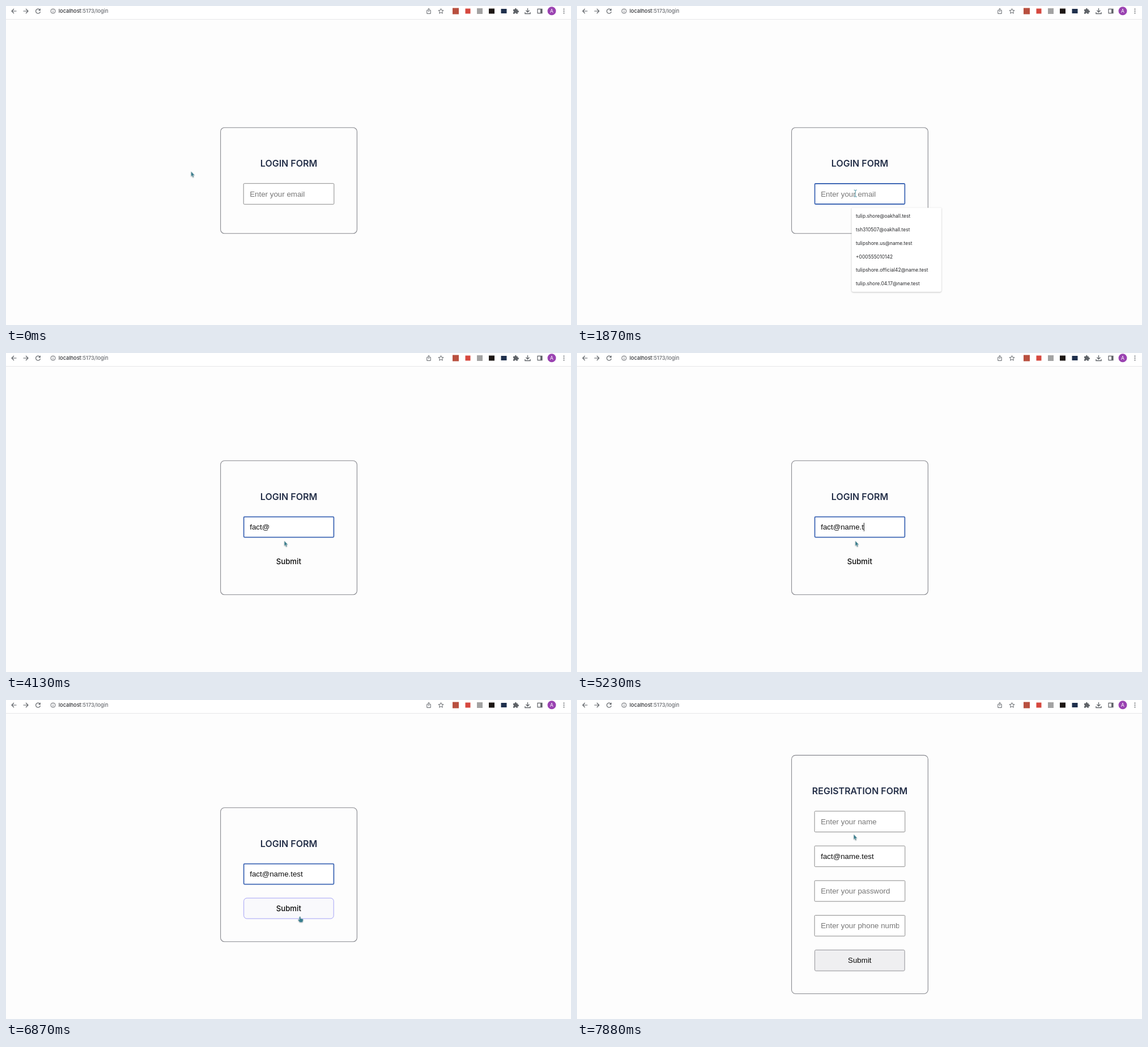
An HTML page with a canvas that plays this animation: 997 px wide and 562 px high, repeating every 8000 ms.

```html
<!DOCTYPE html>
<html lang="en">
<head>
<meta charset="utf-8">
<title>Login form</title>
<style>
  html, body { margin: 0; width: 100%; height: 100%; overflow: hidden; background: #fdfdfd; }
  canvas { display: block; }
</style>
</head>
<body>
<canvas id="stage" width="997" height="562"></canvas>
<script>
const ctx = document.getElementById("stage").getContext("2d");
const LOOP = 8000;
const SANS = '"Liberation Sans", Arial, sans-serif';
const UI = 'Inter, sans-serif';
const FIELD_FONT = `13.33px ${SANS}`;
const INK = "#5f6368";
const EMAIL = "fact@name.test";
const SUGGESTIONS = [
  "tulip.shore@oakhall.test",
  "tsh310507@oakhall.test",
  "tulipshore.us@name.test",
  "+000555010142",
  "tulipshore.official42@name.test",
  "tulip.shore.04.17@name.test"
];

// [time, characters typed, caret visible]
const TYPING = [
  [0, 0, 0], [2020, 1, 1], [2120, 2, 1], [2270, 3, 1], [2820, 3, 0], [2970, 4, 1],
  [3370, 4, 0], [3620, 5, 1], [4130, 5, 0], [4260, 6, 1], [4430, 7, 1], [4590, 8, 1],
  [4920, 9, 1], [5080, 10, 1], [5230, 11, 1], [5690, 11, 0], [6120, 14, 1], [6570, 14, 0]
];

const FOCUS = 1720, SUGGEST = 1870, TYPE = 2020, HOVER = 6720, REGISTER = 7450, LEAVE = 7730;

const clamp = (v, lo, hi) => Math.min(hi, Math.max(lo, v));
const ease = p => p * p * (3 - 2 * p);

function text(str, x, y, font, color, align = "left") {
  ctx.font = font;
  ctx.fillStyle = color;
  ctx.textAlign = align;
  ctx.fillText(str, x, y);
}

function box(x, y, w, h, r, stroke, width = 1, fill) {
  ctx.beginPath();
  ctx.roundRect(x, y, w, h, r);
  if (fill) { ctx.fillStyle = fill; ctx.fill(); }
  if (stroke) { ctx.strokeStyle = stroke; ctx.lineWidth = width; ctx.stroke(); }
}

function disc(x, y, r, color) {
  ctx.beginPath();
  ctx.arc(x, y, r, 0, Math.PI * 2);
  ctx.fillStyle = color;
  ctx.fill();
}

// Draws SVG path data around a centre point.
function icon(x, y, data, { stroke = INK, fill, width = 1.2 } = {}) {
  const path = new Path2D(data);
  ctx.save();
  ctx.translate(x, y);
  if (fill) { ctx.fillStyle = fill; ctx.fill(path); }
  if (stroke) { ctx.strokeStyle = stroke; ctx.lineWidth = width; ctx.stroke(path); }
  ctx.restore();
}

function toolbar() {
  ctx.fillStyle = "#fff";
  ctx.fillRect(0, 0, 997, 23);
  ctx.fillStyle = "#e7e7e8";
  ctx.fillRect(0, 23, 997, 1);

  icon(14, 9, "M4.5 0H-4M0-4L-4 0L0 4");
  icon(35, 9, "M-4.5 0H4M0-4L4 0L0 4");
  icon(56.5, 9, "M3.2-2.4A4 4 0 1 0 4 1");
  icon(56.5, 9, "M4.4-4.8V-.8H.4Z", { stroke: null, fill: INK });
  icon(83, 9, "M4 0A4 4 0 1 1-4 0A4 4 0 1 1 4 0M0-.6V2.3M0-2.4V-1.3", { width: 0.95 });

  const font = `500 9.2px ${UI}`;
  text("localhost", 92.8, 12.2, font, "#303236");
  const hostWidth = ctx.measureText("localhost").width;
  text(":5173/login", 92.8 + hostWidth, 12.2, font, "#6a6d72");

  icon(746, 9, "M-1.4-1.4H-3.2V4.4H3.2V-1.4H1.4M0 1.5V-4.4M-2-2.6L0-4.6L2-2.6", { width: 1 });
  const star = Array.from({ length: 10 }, (_, i) => {
    const a = -Math.PI / 2 + i * Math.PI / 5, r = i % 2 ? 2.1 : 4.7;
    return `${i ? "L" : "M"}${r * Math.cos(a)} ${r * Math.sin(a)}`;
  }).join("") + "Z";
  icon(767.5, 9.3, star, { width: 1 });

  box(788, 3.5, 11, 11, 0, null, 0, "#b9503f");
  box(810.5, 4.5, 9, 9, 0, null, 0, "#d6483f");
  box(831, 4, 10, 10, 0, null, 0, "#a3a3a3");
  box(852, 4.5, 10, 9, 0, null, 0, "#1d1714");
  box(873.5, 5, 10, 8, 0, null, 0, "#1f304d");

  icon(899.5, 9, "M-4.5-3H-1.6A1.5 1.5 0 1 1 1.2-3H3.4V-.7A1.5 1.5 0 1 1 3.4 2.1V4.7H1A1.5 1.5 0 0 0-2 4.7H-4.5V2.3A1.5 1.5 0 0 0-4.5-.6Z",
    { stroke: null, fill: INK });
  icon(920.5, 9, "M0-5V1.6M-3-1.2L0 1.8L3-1.2M-4.6 2V4.5H4.6V2", { width: 1.3 });
  icon(942, 9, "M-4-3.6H4V3.6H-4Z", { width: 1.2 });
  ctx.fillStyle = INK;
  ctx.fillRect(943, 5, 3, 8);
  disc(963, 8.7, 7.5, "#9a42b1");
  text("A", 963, 11.8, `8.5px ${UI}`, "#fff", "center");
  for (const dy of [-3.6, 0, 3.6]) disc(984.5, 9 + dy, 1, INK);
}

function card(top, bottom, title) {
  box(378.6, top, 240.8, bottom - top, 7, "#88898f", 1.1);
  text(title, 499, top + 68.8, `600 16px ${UI}`, "#242f48", "center");
}

function field(cy, { value = "", placeholder = "", focused = false, caret = false }) {
  if (focused) box(419.6, cy - 18, 158.8, 36, 1.5, "#4068b5", 1.8, "#fff");
  else box(419.2, cy - 18.3, 159.6, 36.6, 1.5, "#858585", 0.95, "#fff");
  ctx.save();
  ctx.beginPath();
  ctx.rect(430, cy - 18, 138.4, 36);
  ctx.clip();
  text(value || placeholder, 430.2, cy + 4.7, FIELD_FONT, value ? "#0c0c0c" : "#777");
  if (caret) {
    ctx.fillStyle = "#111";
    ctx.fillRect(430.2 + ctx.measureText(value).width, cy - 7.5, 0.9, 15);
  }
  ctx.restore();
}

function suggestions() {
  ctx.save();
  ctx.shadowColor = "rgba(0,0,0,.28)";
  ctx.shadowBlur = 2.5;
  ctx.shadowOffsetY = 0.8;
  box(484.6, 355.5, 158.4, 148.2, [0, 0, 3, 3], null, 0, "#fff");
  ctx.restore();
  SUGGESTIONS.forEach((line, i) =>
    text(line, 492, 373.4 + i * 23.77, `8.5px ${UI}`, "#27282b"));
}

function submitButton(t) {
  if (t >= HOVER) {
    const step = Math.floor((t - HOVER) / 150);
    const alpha = clamp(0.1 + step * 0.5, 0, 1);
    box(419.6, 349, 158.6, 36.2, 5.5, `rgba(100,98,240,${alpha})`, 0.95, "#f9f9fc");
  }
  text("Submit", 498.8, 372.3, `500 13.2px ${UI}`, "#0b0b0b", "center");
}

function loginForm(t) {
  const [, count, caret] = TYPING.findLast(([start]) => t >= start);
  const typing = t >= TYPE;
  const top = typing ? 189.8 : 214.2;
  card(top, typing ? 425.8 : 400.8, "LOGIN FORM");
  field(top + 116.8, {
    value: EMAIL.slice(0, count),
    placeholder: "Enter your email",
    focused: t >= FOCUS,
    caret
  });
  if (typing) submitButton(t);
  else if (t >= SUGGEST) suggestions();
}

function registrationForm() {
  card(97.4, 517.5, "REGISTRATION FORM");
  [
    { placeholder: "Enter your name" },
    { value: EMAIL },
    { placeholder: "Enter your password" },
    { placeholder: "Enter your phone number" }
  ].forEach((options, i) => field(214.2 + i * 61.15, options));
  box(419.6, 440.4, 158.6, 36.8, 2, "#8e8e92", 0.95, "#efeff1");
  text("Submit", 498.8, 463.4, FIELD_FONT, "#0b0b0b", "center");
}

// The pointer travels in discrete jumps along eased paths.
const REST = [326.8, 291.8], INPUT = [491.3, 331.2], BUTTON = [518.8, 381.6], EXIT = [488.5, 237];
const MOVES = [
  { start: 950, steps: 6, gap: 153, from: REST, to: INPUT },
  { start: 6570, steps: 3, gap: 150, from: INPUT, to: BUTTON },
  { start: LEAVE, steps: 2, gap: 150, from: BUTTON, to: EXIT }
];

function pointerPosition(t) {
  const move = MOVES.findLast(m => t >= m.start);
  if (!move) return REST;
  const { start, steps, gap, from, to } = move;
  const p = ease(clamp(Math.floor((t - start) / gap) + 1, 0, steps) / steps);
  return from.map((v, i) => v + (to[i] - v) * p);
}

function pointer(t) {
  const [x, y] = pointerPosition(t);
  const overInput = (t < TYPE && x > 419) || (t >= REGISTER && t < LEAVE);
  const teal = "#387f90";
  if (overInput) {
    icon(x, y - 1, "M-2.6-6Q0-6 0-4Q0-6 2.6-6M0-4.5V4.5M-2.6 6Q0 6 0 4Q0 6 2.6 6",
      { stroke: "#77adb8", width: 1.3 });
    return;
  }
  ctx.save();
  ctx.shadowColor = "rgba(0,0,0,.3)";
  ctx.shadowBlur = 2;
  ctx.shadowOffsetY = 0.7;
  const style = { fill: teal, stroke: "#b9d3d9", width: 0.5 };
  if (t >= HOVER && t < REGISTER) {
    icon(x, y, "M-1 .8Q0-.8 .9 .8V3.6L4.5 4.2Q5.8 4.6 5.4 6.4L4.3 9.8H-.4L-3.2 6.2Q-3.4 4.8-2 5.2L-1 6Z", style);
  } else {
    icon(x, y, "M0 0V8.3L1.8 6.8L3.1 10L4.4 9.4L3.1 6.3H5.7Z", style);
  }
  ctx.restore();
}

function draw(t) {
  ctx.fillStyle = "#fdfdfd";
  ctx.fillRect(0, 0, 997, 562);
  toolbar();
  if (t < REGISTER) loginForm(t);
  else registrationForm();
  pointer(t);
}

const origin = performance.now();
function tick() {
  draw((performance.now() - origin) % LOOP);
  requestAnimationFrame(tick);
}
tick();
</script>
</body>
</html>
```
